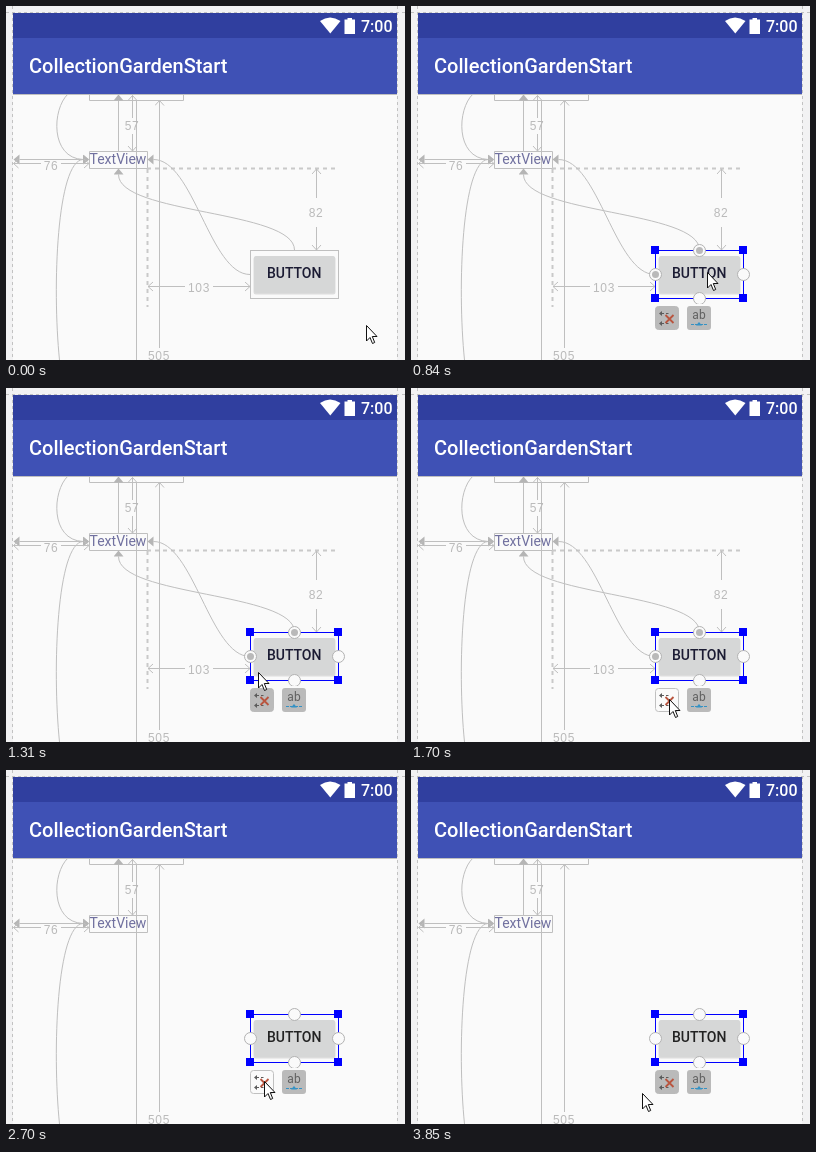
An HTML page for the animation above (4.55 s loop, 399 by 354 pixels).

```html
<!DOCTYPE html>
<html lang="en">
<head>
<meta charset="utf-8">
<title>Layout editor</title>
<style>
  html, body { margin: 0; width: 100%; height: 100%; overflow: hidden; background: #f2f2f3; }
  svg { display: block; }
  text { font-family: Roboto, sans-serif; }
  .medium { font-weight: 500; }
  .line { fill: none; stroke: #bfbfbf; }
  .label text { font: 12px "Liberation Sans", Arial, sans-serif; letter-spacing: .6px; fill: #bababa; text-anchor: middle; }
  .dim { marker-start: url(#open); marker-end: url(#open); }
  .from { marker-start: url(#open); }
  .link { marker-end: url(#solid); }
  .guide { fill: none; stroke: #c9c9c9; stroke-width: 2; stroke-dasharray: 4 4; }
  .edge { fill: none; stroke: #c2c2c2; stroke-dasharray: 3 3; }
  .knob { fill: #fafafa; stroke: #b2b2b2; }
  .dot { fill: #b9b9b9; }
</style>
</head>
<body>
<svg width="399" height="354" viewBox="0 0 399 354">
  <defs>
    <marker id="open" markerUnits="userSpaceOnUse" markerWidth="14" markerHeight="14" refX="6" refY="5" orient="auto-start-reverse">
      <path class="line" d="M1 0.5L6 5L1 9.5"/>
    </marker>
    <marker id="solid" markerUnits="userSpaceOnUse" markerWidth="14" markerHeight="14" refX="0" refY="5" orient="auto">
      <path fill="#b5b5b5" d="M0 0L6 5L0 10Z"/>
    </marker>
    <clipPath id="above"><path d="M230 230H350V298H230Z"/></clipPath>
  </defs>

  <path fill="#fafafa" d="M7 88H391V354H7Z"/>

  <!-- fixed constraints -->
  <g class="line">
    <path d="M83.5 88V94.5H177.5V88"/>
    <path d="M83.5 145.5H141.5V162.5H83.5Z"/>
    <path d="M130.5 94V354"/>
    <path class="link" d="M112.5 145V94.5"/>
    <path class="link" d="M62 88C46 103 44 152 77 153.5"/>
    <path class="link" d="M53.5 354C46 280 51 155 77 153.5"/>
    <path class="link" d="M77 153.5H13.5"/>
    <path class="dim" d="M126.5 89.5V112M126.5 128V145"/>
    <path class="dim" d="M7.5 157.5H35M55 157.5H83"/>
    <path class="from" d="M153.5 94.5V342"/>
  </g>
  <g class="label">
    <text x="126" y="124">57</text>
    <text x="45" y="164">76</text>
    <text x="153" y="354">505</text>
  </g>
  <text x="83.5" y="158" font-size="14" fill="#70709f">TextView</text>

  <!-- constraints of the button -->
  <g id="links">
    <path class="guide" d="M141 162.5H332"/>
    <path class="guide" d="M141.5 163V301"/>
    <g class="line">
      <path class="link" d="M288.5 244C288.5 204 112.5 208.5 112.5 168.5"/>
      <path class="link" d="M244 268.5C204 268.5 187.5 153.5 147.5 153.5"/>
      <path class="dim" d="M310.5 163V192M310.5 221V244"/>
      <path class="dim" d="M142 280.5H179M207 280.5H244"/>
    </g>
    <g class="label">
      <text x="310" y="211">82</text>
      <text x="193" y="286">103</text>
    </g>
  </g>

  <!-- button -->
  <rect x="247.5" y="250.5" width="82" height="38" rx="2.5" opacity=".12"/>
  <rect x="248" y="250" width="81" height="37" rx="2" fill="#d6d7d7"/>
  <text id="caption" class="medium" x="288.2" y="272" font-size="14" text-anchor="middle">BUTTON</text>
  <rect id="frame" x="244.5" y="244.5" width="88" height="48" fill="none"/>

  <g id="selection">
    <path fill="#00f" d="M240 240h8v8h-8zM328 240h8v8h-8zM240 288h8v8h-8zM328 288h8v8h-8z"/>
    <g class="knob" clip-path="url(#above)">
      <circle cx="288.5" cy="244.5" r="6"/>
      <circle cx="332.5" cy="268.5" r="6"/>
      <circle cx="288.5" cy="292.5" r="6"/>
      <circle cx="244.5" cy="268.5" r="6"/>
    </g>
    <g id="dots" class="dot">
      <circle cx="288.5" cy="244.5" r="3.5"/>
      <circle cx="244.5" cy="268.5" r="3.5"/>
    </g>
    <rect id="remove" x="244.5" y="300.5" width="23" height="23" rx="3"/>
    <g fill="#5c5c5c">
      <path d="M248 307.5L251 305V307H253V308H251V310ZM255 307H257.5V308H255Z"/>
      <path d="M248 317.5L251 315V317H253V318H251V320ZM255 317H257.5V318H255Z"/>
    </g>
    <path stroke="#b9553f" stroke-width="1.8" d="M254.5 309L262.5 317M262.5 309L254.5 317"/>
    <rect x="276" y="300" width="24" height="24" rx="3" fill="#bababa"/>
    <text x="288" y="313" font-size="12" fill="#606060" text-anchor="middle">ab</text>
    <path stroke="#3592c4" d="M280 318.5H283M284 318.5H292M293 318.5H296"/>
    <path fill="#3592c4" d="M285 319.5H291L288 316Z"/>
  </g>

  <!-- app bars -->
  <path fill="#303f9f" d="M7 7H391V32H7Z"/>
  <path fill="#3f51b5" d="M7 32H391V88H7Z"/>
  <path class="line" d="M7 88.5H391"/>
  <path class="edge" d="M0 6.5H399M6.5 0V354M391.5 0V354"/>
  <g fill="#fff">
    <path d="M314 15Q324 8 334.5 15L324.3 27.5Z"/>
    <path d="M338.5 13.5H341.5V12H346V13.5H349V28H338.5Z"/>
    <text class="medium" x="355" y="26" font-size="16">7:00</text>
    <text class="medium" x="23" y="67" font-size="20">CollectionGardenStart</text>
  </g>

  <path id="cursor" fill="#fff" stroke="#111" stroke-linejoin="round"
        d="M.5 .5V16L4 12.5L6.5 18.5L8.7 17.5L6.3 11.5H11Z"/>
</svg>

<script>
const LOOP = 4550;
const IDLE = 0, HOVER = 1, PICKED = 2;
const STROKES = ['#bfbfbf', '#56a5dc', '#0000ff'];

// time, cursor x, cursor y, button mode, remove hovered, links shown
const steps = [
  [0,    360, 319, IDLE,   0, 1],
  [370,  345, 307, IDLE,   0, 1],
  [460,  318, 286, HOVER,  0, 1],
  [550,  300, 272, HOVER,  0, 1],
  [690,  297, 267, HOVER,  0, 1],
  [770,  296, 266, PICKED, 0, 1],
  [1160, 288, 267, PICKED, 0, 1],
  [1240, 268, 275, PICKED, 0, 1],
  [1310, 252, 284, PICKED, 0, 1],
  [1390, 251, 291, PICKED, 0, 1],
  [1470, 252, 300, PICKED, 0, 1],
  [1540, 256, 312, PICKED, 1, 1],
  [1620, 257, 311, PICKED, 1, 1],
  [1700, 258, 311, PICKED, 1, 1],
  [2480, 258, 311, PICKED, 0, 1],
  [2550, 258, 311, PICKED, 0, 0],
  [2700, 258, 311, PICKED, 1, 0],
  [3630, 253, 313, PICKED, 1, 0],
  [3700, 243, 318, PICKED, 0, 0],
  [3780, 235, 322, PICKED, 0, 0],
  [3850, 231, 323, PICKED, 0, 0]
];

const el = id => document.getElementById(id);
const set = (id, attrs) => {
  for (const key in attrs) el(id).setAttribute(key, attrs[key]);
};

function show([, x, y, mode, hovered, links]) {
  set('cursor', { transform: `translate(${x} ${y})` });
  set('frame', { stroke: STROKES[mode] });
  set('selection', { opacity: mode === PICKED ? 1 : 0 });
  set('remove', {
    fill: hovered ? '#fafafa' : '#bababa',
    stroke: hovered ? '#c0c0c0' : '#bababa'
  });
  set('links', { opacity: links });
  set('dots', { opacity: links });
  set('caption', { fill: links ? '#1b1b33' : '#222222' });
}

const start = performance.now();
let current;

function tick() {
  const time = (performance.now() - start) % LOOP;
  const step = steps.findLast(s => s[0] <= time) || steps[0];
  if (step !== current) show(current = step);
  requestAnimationFrame(tick);
}
tick();
</script>
</body>
</html>
```
